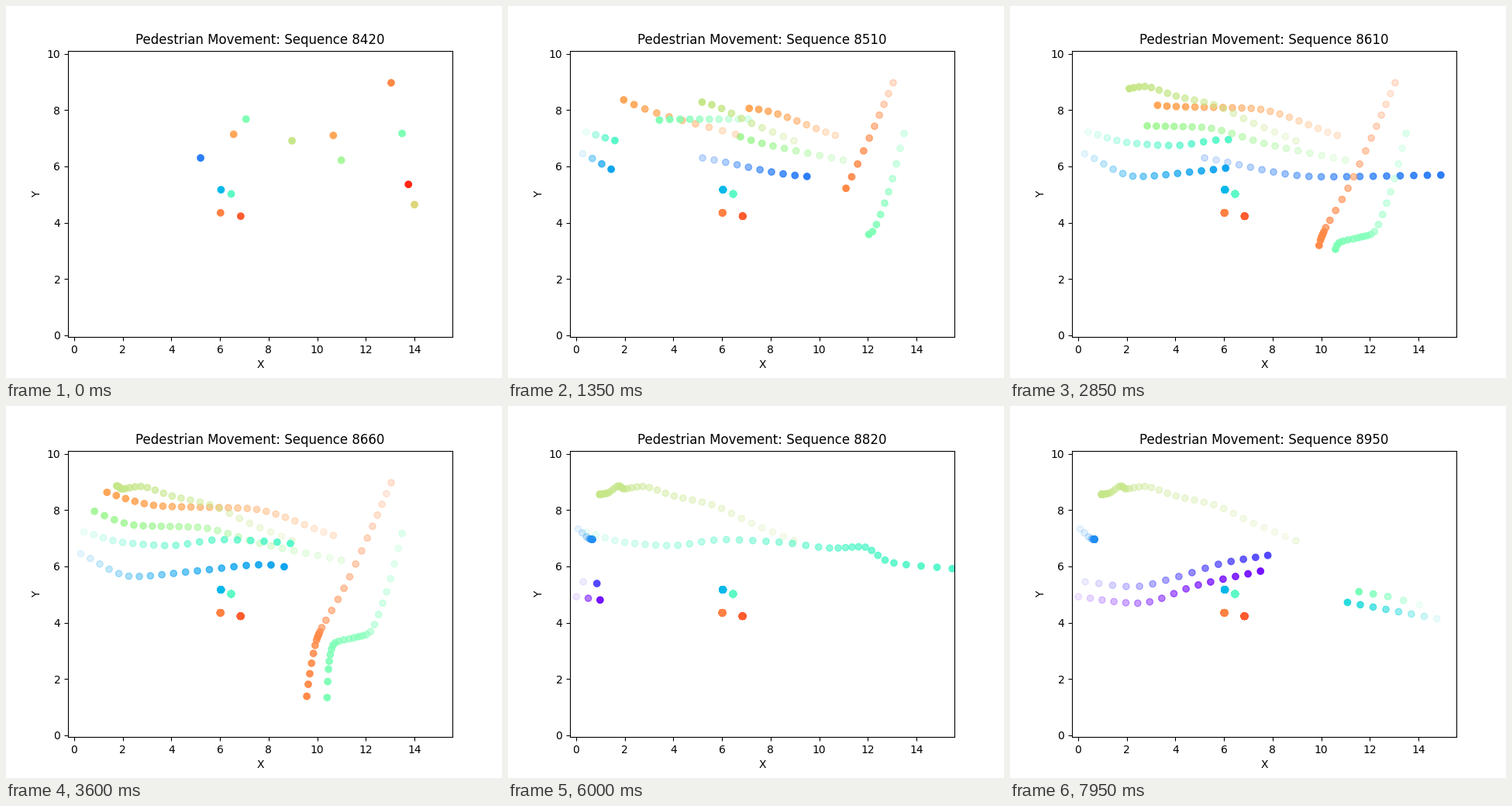
A matplotlib script that plays this animation: 640 px wide and 480 px high, repeating every 8 s.

```python
import matplotlib.pyplot as plt
import numpy as np
from matplotlib.animation import FuncAnimation

INTERVAL = 50
FRAMES = 160
FRAMES_PER_STEP = 3
LAST_STEP = (FRAMES - 1) // FRAMES_PER_STEP
FIRST_SEQUENCE = 8420


def smooth_path(points, t):
    """Curve without overshoot through evenly timed points, t in 0..1."""
    points = np.array(points, dtype=float)
    deltas = np.diff(points, axis=0)
    before, after = deltas[:-1], deltas[1:]
    product, total = before * after, before + after
    inner = np.where(product > 0, 2 * product / np.where(product > 0, total, 1), 0)
    slopes = np.vstack([deltas[:1], inner, deltas[-1:]])

    position = np.clip(t, 0, 1) * len(deltas)
    i = np.minimum(position.astype(int), len(deltas) - 1)
    u = (position - i)[:, None]
    ease = u * u * (3 - 2 * u)
    return (points[i] + ease * deltas[i]
            + u * (1 - u) ** 2 * slopes[i] - u * u * (1 - u) * slopes[i + 1])


class Walker:
    def __init__(self, hue, enter, arrive, *points, stays=False):
        self.color = plt.cm.rainbow(hue)[:3]
        self.enter = enter
        self.leave = LAST_STEP if stays else arrive
        steps = np.arange(enter, self.leave + 1)
        self.path = smooth_path(points, (steps - enter) / (arrive - enter))

    def visible(self, step):
        return self.enter <= step <= self.leave

    def trail(self, step):
        """Positions so far with colors fading towards the oldest."""
        points = self.path[:step - self.enter + 1]
        if self.enter == 0:
            # the opening position is recorded twice
            points = np.vstack([points[:1], points])
        alphas = np.linspace(0.1, 1, len(points))
        return points, np.array([(*self.color, alpha) for alpha in alphas])


standing = [(0.26, 6.04, 5.17), (0.43, 6.46, 5.02),
            (0.83, 6.02, 4.35), (0.88, 6.85, 4.23)]
walkers = [Walker(hue, 0, LAST_STEP, (x, y), (x - 0.015, y))
           for hue, x, y in standing]

walkers += [
    # leaving on the right
    Walker(0.95, 0, 3, (13.75, 5.36), (15.2, 5.3)),
    Walker(0.68, 0, 2, (14.0, 4.64), (15.1, 4.55)),
    Walker(0.165, 0, 20, (5.2, 6.3), (10.0, 5.63), (15.47, 5.7)),
    # leaving at the bottom
    Walker(0.82, 0, 27, (13.04, 8.97), (12.17, 7.22), (11.1, 5.22),
           (10.14, 3.74), (9.97, 3.38), (9.66, 2.0), (9.4, -0.02)),
    Walker(0.495, 0, 26, (13.49, 7.17), (12.8, 4.96), (12.09, 3.6),
           (11.5, 3.46), (10.7, 3.26), (10.47, 2.45), (10.36, 0.15)),
    # leaving on the left
    Walker(0.58, 0, 26, (10.99, 6.22), (7.87, 6.77), (5.08, 7.39),
           (2.65, 7.45), (0.02, 8.25)),
    Walker(0.77, 0, 27, (10.66, 7.1), (7.12, 8.06), (3.65, 8.14), (0.2, 8.95)),
    Walker(0.77, 0, 14, (6.56, 7.14), (2.83, 8.04), (-0.04, 9.27)),
    Walker(0.50, 0, 16, (7.07, 7.68), (3.85, 7.67), (0.3, 6.9)),
    # coming to rest in the upper left
    Walker(0.64, 0, 32, (8.96, 6.91), (7.22, 7.53), (5.58, 8.19),
           (4.03, 8.5), (2.74, 8.84), (1.98, 8.75), (1.75, 8.86),
           (1.28, 8.6), (0.98, 8.56), stays=True),
    Walker(0.19, 30, 36, (0.08, 7.33), (0.54, 6.98), (0.66, 6.96), stays=True),
    # crossing from the left
    Walker(0.225, 6, 39, (0.27, 6.45), (2.46, 5.64), (5.07, 5.84),
           (7.84, 6.06), (10.62, 5.63), (12.2, 5.58), (15.25, 5.7)),
    Walker(0.42, 6, 40, (0.41, 7.22), (2.1, 6.84), (3.95, 6.74),
           (6.05, 6.95), (8.35, 6.86), (10.52, 6.65), (11.76, 6.7),
           (12.97, 6.14), (15.47, 5.92)),
    Walker(0.02, 38, 53, (0.01, 4.92), (2.45, 4.69), (4.94, 5.34), (7.5, 5.83)),
    Walker(0.09, 39, 53, (0.29, 5.45), (2.25, 5.28), (4.14, 5.64),
           (6.03, 6.13), (7.8, 6.39)),
    # entering from the right
    Walker(0.33, 46, 53, (14.76, 4.14), (11.08, 4.72)),
    Walker(0.485, 49, 53, (14.03, 4.63), (12.74, 4.93), (11.55, 5.1)),
]

fig, ax = plt.subplots(figsize=(6.4, 4.8), dpi=100)
ax.set_xlim(-0.255, 15.56)
ax.set_ylim(-0.067, 10.113)
ax.set_xlabel("X")
ax.set_ylabel("Y")
title = ax.set_title("")
dots = ax.scatter([], [], s=36)


def update(frame):
    step = frame // FRAMES_PER_STEP
    trails = [w.trail(step) for w in walkers if w.visible(step)]
    points, colors = (np.vstack(parts) for parts in zip(*trails))
    dots.set_offsets(points)
    dots.set_facecolor(colors)
    dots.set_edgecolor(colors)
    title.set_text(f"Pedestrian Movement: Sequence {FIRST_SEQUENCE + 10 * step}")
    return dots, title


anim = FuncAnimation(fig, update, frames=FRAMES, interval=INTERVAL,
                     repeat=True, repeat_delay=0)
plt.show()
```
